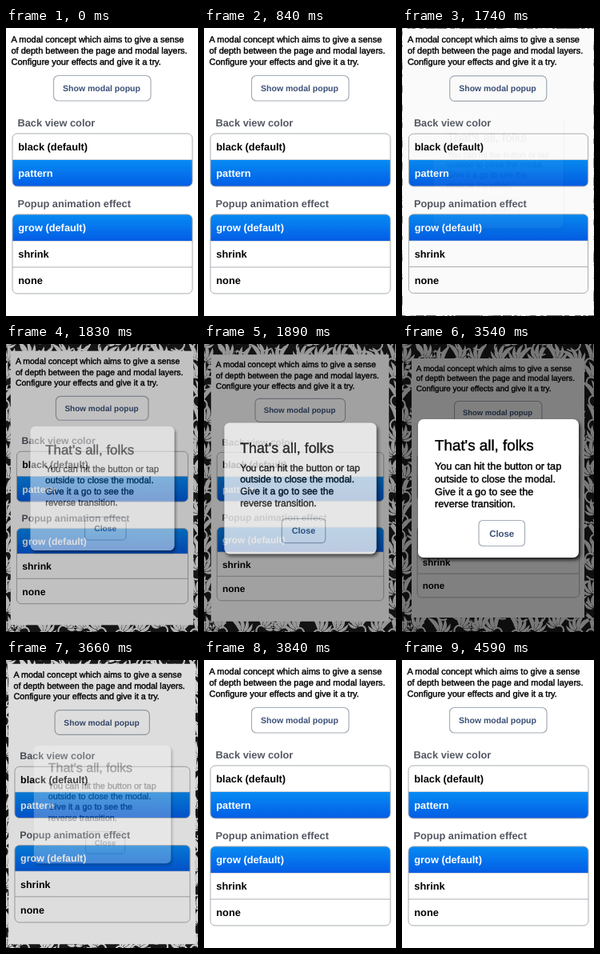
Recreate the animation shown at these times as an HTML page. Size 240x360 px, loop 4710 ms.

```html
<!DOCTYPE html>
<html lang="en">
<head>
<meta charset="utf-8">
<title>Modal depth</title>
<style>
  html, body { margin: 0; width: 100%; height: 100%; overflow: hidden; background: #fff; }
  svg { display: block; width: 100%; height: 100%; }
  text { font: bold 12.8px "Liberation Sans", Arial, sans-serif; text-rendering: geometricPrecision; }
  .medium { font-weight: normal; stroke: #000; stroke-width: .4px; }
  .intro { font-size: 11px; }
  .heading { fill: #535862; }
  .link { fill: #3b5078; font-size: 10.5px; text-anchor: middle; }
  .selected { fill: #fff; }
  .title { font-size: 18.8px; }
  .body { font-size: 12.7px; }
  .button { fill: #fff; stroke: #a5adb7; stroke-width: 1.2; }
  .frame { fill: none; stroke: #aaaeb3; }
  #modal { filter: drop-shadow(2px 3px 2px rgba(0, 0, 0, .8)); }
</style>
</head>
<body>
<svg viewBox="0 0 240 360">
  <defs>
    <linearGradient id="blue" x2="0" y2="1">
      <stop stop-color="#078bf4"/><stop offset="1" stop-color="#035de5"/>
    </linearGradient>
  </defs>
  <rect width="240" height="360" fill="#1c1c1c"/>
  <path id="leaves" fill="#eee"/>
  <path id="curls" fill="none" stroke="#eee" stroke-width="2" stroke-linecap="round"/>

  <g id="page">
    <rect width="240" height="360" fill="#fff"/>
    <text class="medium intro" x="6.5" y="17.5">A modal concept which aims to give a sense</text>
    <text class="medium intro" x="6.5" y="31.7">of depth between the page and modal layers.</text>
    <text class="medium intro" x="6.5" y="45.8">Configure your effects and give it a try.</text>
    <rect class="button" x="59.5" y="59.5" width="121.5" height="31.5" rx="6"/>
    <text class="link" x="119.5" y="79">Show modal popup</text>
    <text class="heading" x="14.5" y="122.5">Back view color</text>
    <g id="colors"></g>
    <text class="heading" x="14.5" y="224">Popup animation effect</text>
    <g id="effects"></g>
  </g>
  <rect id="shade" width="240" height="360"/>

  <g id="modal">
    <rect x="20" y="94" width="201" height="173" rx="7" fill="#fff"/>
    <text class="medium title" x="41" y="133">That's all, folks</text>
    <text class="medium body" x="41" y="157.3">You can hit the button or tap</text>
    <text class="medium body" x="41" y="173">outside to close the modal.</text>
    <text class="medium body" x="41" y="188.6">Give it a go to see the</text>
    <text class="medium body" x="41" y="204.3">reverse transition.</text>
    <rect class="button" x="96" y="220.5" width="57.5" height="32" rx="5"/>
    <text class="link" x="124.7" y="240.7" style="font-size:11.4px">Close</text>
  </g>
</svg>
<script>
const LOOP = 4710, ROW = 33;
const OPEN = { start: 1720, length: 390 };
const CLOSE = { start: 3540, length: 275 };
const el = id => document.getElementById(id);

function buildList(id, top, labels, selected) {
  const height = labels.length * ROW, last = labels.length - 1;
  const rows = labels.map((label, i) => {
    const y = top + i * ROW, on = i === selected;
    const line = i < last ? `<path class="frame" d="M8 ${y + ROW}H233"/>` : '';
    const fill = on ? `<rect x="8" y="${y}" width="225" height="${ROW}" fill="url(#blue)"/>` : '';
    return `${line}${fill}<text x="15.3" y="${y + 21.4}" class="${on ? 'selected' : ''}">${label}</text>`;
  }).join('');
  const box = `x="8" y="${top}" width="225" height="${height}" rx="6"`;
  el(id).innerHTML = `<clipPath id="${id}Clip"><rect ${box}/></clipPath>` +
    `<g clip-path="url(#${id}Clip)">${rows}</g><rect class="frame" ${box}/>`;
}
buildList('colors', 132, ['black (default)', 'pattern'], 1);
buildList('effects', 233, ['grow (default)', 'shrink', 'none'], 0);

// Backdrop: upward fans of long crescent leaves, each with a spiral tendril.
let seed = 7;
const random = () => (seed = seed * 16807 % 2147483647) / 2147483647;
const polar = (x, y, angle, r) =>
  `${(x + r * Math.cos(angle)).toFixed(1)} ${(y + r * Math.sin(angle)).toFixed(1)}`;

function drawBackdrop() {
  let leaves = '', curls = '';
  for (let y = 0; y <= 384; y += 24) {
    for (let x = 0; x <= 240; x += 24) {
      const cx = x + random() * 8 - 4, cy = y + random() * 8 - 4;
      const turn = random() < .5 ? 1 : -1;
      const base = -Math.PI / 2 - turn * (.3 + random() * .6);
      for (let i = 0; i < 5; i++) {
        const a = base + turn * i * .45, r = 27 - i * 2.5;
        leaves += `M${polar(cx, cy, a, 3)}Q${polar(cx, cy, a + turn * .7, r * .7)} ${polar(cx, cy, a, r)}` +
          `Q${polar(cx, cy, a + turn * .1, r * .55)} ${polar(cx, cy, a, 3)}Z`;
      }
      for (let i = 0; i <= 12; i++) {
        curls += (i ? 'L' : 'M') + polar(cx, cy, base + turn * (3 + i * .35), 12 - i * .7);
      }
    }
  }
  el('leaves').setAttribute('d', leaves);
  el('curls').setAttribute('d', curls);
}
drawBackdrop();

// CSS "ease": cubic-bezier(.25, .1, .25, 1)
function ease(x) {
  if (x <= 0) return 0;
  if (x >= 1) return 1;
  const bezier = (u, a, b) => 3 * u * (1 - u) * (1 - u) * a + 3 * u * u * (1 - u) * b + u ** 3;
  let low = 0, high = 1;
  for (let i = 0; i < 20; i++) {
    const mid = (low + high) / 2;
    if (bezier(mid, .25, .25) < x) low = mid; else high = mid;
  }
  return bezier(low, .1, 1);
}
const progress = (t, { start, length }) => ease((t - start) / length);
const scaleAbout = (x, y, s) => `translate(${x} ${y}) scale(${s}) translate(${-x} ${-y})`;

function draw() {
  const t = performance.now() % LOOP;
  const depth = progress(t, OPEN) - progress(t, CLOSE);
  el('page').setAttribute('transform', scaleAbout(120, 180, 1 - .1 * depth));
  el('shade').setAttribute('opacity', .5 * depth);
  el('modal').setAttribute('transform', scaleAbout(120.5, 180.5, .8 + .2 * depth));
  el('modal').setAttribute('opacity', depth);
  requestAnimationFrame(draw);
}
draw();
</script>
</body>
</html>
```
